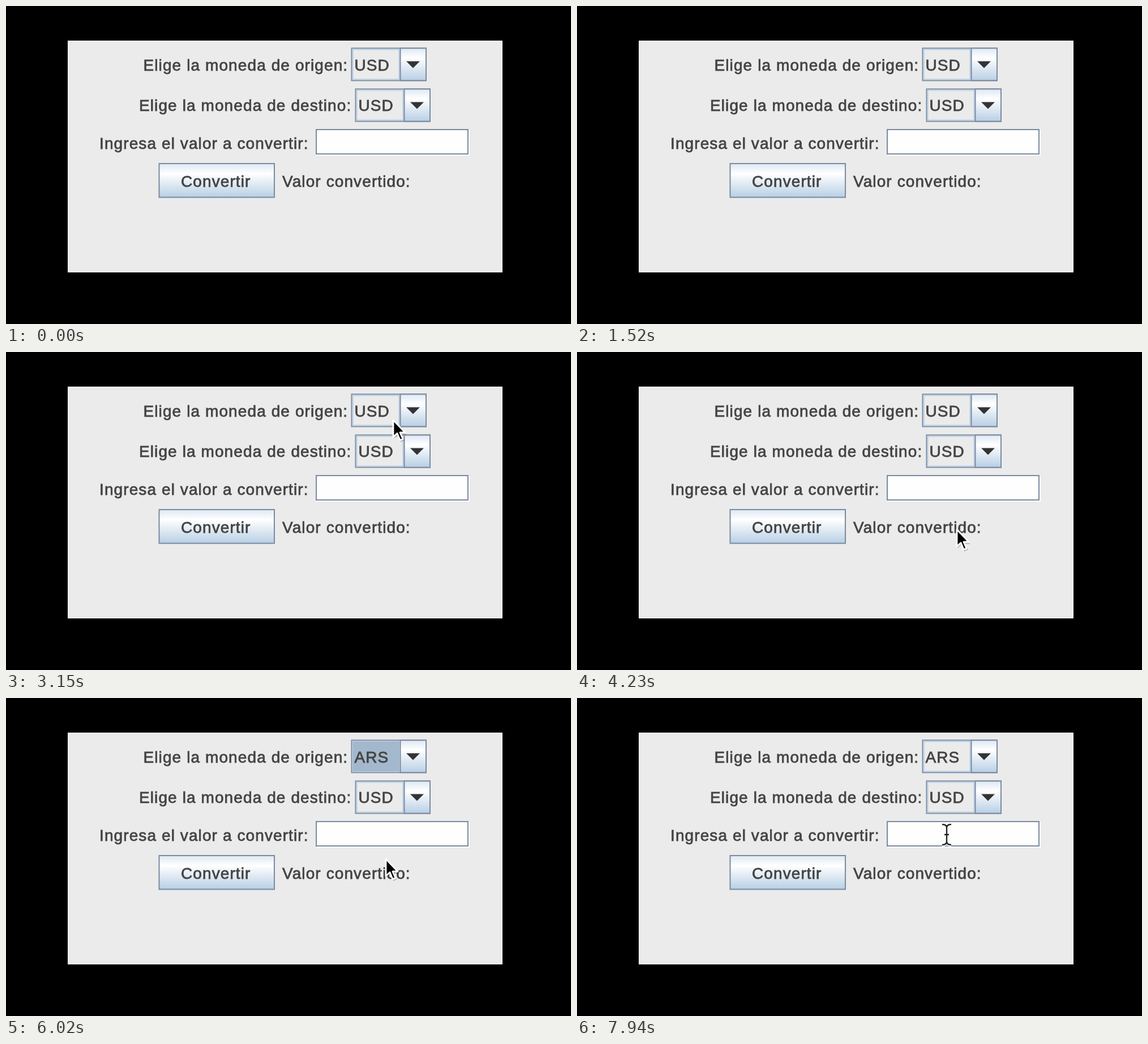
Write an HTML page that moves like this. It is 998 by 561 pixels and loops after 8000 ms.

```html
<!DOCTYPE html>
<html lang="es">
<head>
<meta charset="utf-8">
<title>Conversor de moneda</title>
<style>
  html, body { margin: 0; width: 100%; height: 100%; overflow: hidden; background: #000; }
  svg { display: block; width: 998px; height: 561px; }
  text {
    font: 28px "Liberation Sans", Arial, sans-serif;
    letter-spacing: 1.1px;
    fill: #444; stroke: #444; stroke-width: .8px;
  }
  .edge { stroke: #7a8a9f; stroke-width: 2; }
</style>
</head>
<body>
<svg viewBox="0 0 998 561">
  <defs>
    <linearGradient id="steel" x2="0" y2="1">
      <stop offset="0" stop-color="#dde8f3"/>
      <stop offset=".3" stop-color="#fff"/>
      <stop offset=".5" stop-color="#eaf1f7"/>
      <stop offset="1" stop-color="#b8cfe5"/>
    </linearGradient>
    <clipPath id="window"><path d="M109 61H877V470H109z"/></clipPath>
    <g id="combo">
      <path class="edge" fill="#ebebeb" d="M1 1H132.500V58H1z"/>
      <path fill="none" stroke="#b8cfe5" stroke-width="2" d="M3 3H85V56H3z"/>
      <path class="edge" fill="url(#steel)" d="M87 1H132.500V58H87z"/>
      <path fill="#333" d="M97.500 24H121.500L109.500 36z"/>
    </g>
    <path id="beamShape" d="M-8 -18Q0 -18 0 -12Q0 -18 8 -18M0 -13V13M-8 18Q0 18 0 12Q0 18 8 18M-4 0H4"/>
  </defs>

  <path fill="#ebebeb" d="M109 61H877V470H109z"/>

  <text x="242.500" y="113.500">Elige la moneda de origen:</text>
  <use href="#combo" x="609.500" y="73.500"/>
  <path id="focus" fill="#a3b8cc" d="M612.500 76.500H694.500V129.500H612.500z"/>
  <text id="currency" x="615.500" y="113.500">USD</text>

  <text x="235" y="185">Elige la moneda de destino:</text>
  <use href="#combo" x="616.500" y="145.500"/>
  <text x="622.500" y="185">USD</text>

  <text x="165" y="252">Ingresa el valor a convertir:</text>
  <path fill="#fff" d="M549 219H819V264H549z"/>
  <path class="edge" fill="#fefefe" d="M548 218H816V261H548z"/>
  <path id="caret" stroke="#333" stroke-width="2" d="M552 222V259"/>

  <path class="edge" fill="url(#steel)" d="M270.500 278H474V337.500H270.500z"/>
  <text x="309" y="319">Convertir</text>
  <text x="488" y="319">Valor convertido:</text>

  <g clip-path="url(#window)">
    <g id="arrow" stroke-linejoin="round">
      <path fill="#000" opacity=".18" d="M1 3V33L8 28L13 39L20 36L15 26H24z"/>
      <path fill="#000" stroke="#fff" stroke-width="2.800" d="M0 0V30L7 23.500L12 35.500L17 33.500L12 22H21z"/>
    </g>
    <g id="beam" fill="none">
      <use href="#beamShape" stroke="#fff" stroke-width="6"/>
      <use href="#beamShape" stroke="#222" stroke-width="2.400"/>
    </g>
  </g>
</svg>
<script>
const LOOP = 8000;
const el = id => document.getElementById(id);
const show = (id, on) => el(id).setAttribute("visibility", on ? "visible" : "hidden");
const within = (v, from, to) => v >= from && v < to;

// Pointer stops: time, x, y
const stops = [
  [2350, 880, 210], [2790, 700, 112], [3150, 684, 120], [3580, 672, 316],
  [3630, 672, 316], [3770, 671, 313], [4830, 671, 313], [5600, 673, 100],
  [5690, 673, 100], [5950, 671, 284], [6060, 671, 284], [6480, 704, 195],
  [6850, 704, 195], [7300, 676, 236], [7440, 653, 241]
];

function pointerAt(t) {
  const next = stops.findIndex(stop => stop[0] > t);
  if (next < 0) return stops.at(-1).slice(1);
  if (next === 0) return stops[0].slice(1);
  const [t0, x0, y0] = stops[next - 1], [t1, x1, y1] = stops[next];
  const u = (t - t0) / (t1 - t0), eased = u * u * (3 - 2 * u);
  return [x0 + (x1 - x0) * eased, y0 + (y1 - y0) * eased];
}

function draw(now) {
  const t = now % LOOP;
  const [x, y] = pointerAt(t);
  const visible = t >= stops[0][0];
  const overField = within(x, 547, 817) && within(y, 217, 262);

  show("arrow", visible && !overField);
  show("beam", visible && overField);
  for (const id of ["arrow", "beam"]) el(id).setAttribute("transform", `translate(${x} ${y})`);

  el("currency").textContent = t < 5950 ? "USD" : "ARS";
  show("focus", within(t, 5690, 7440));
  show("caret", within(t, 7440, 7940));
  requestAnimationFrame(draw);
}
draw(performance.now());
</script>
</body>
</html>
```
